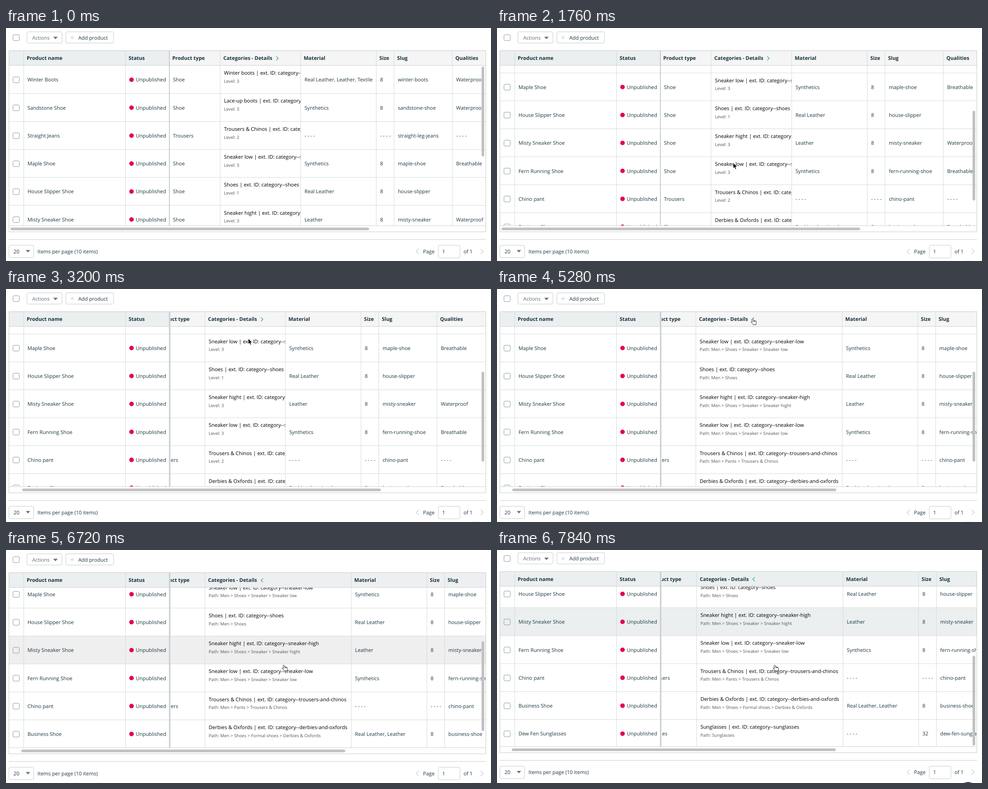
An HTML page for the animation above (8000 ms loop, 1078x519 px).

```html
<!DOCTYPE html>
<html lang="en">
<head>
<meta charset="utf-8">
<title>Product table</title>
<style>
  html, body { margin: 0; width: 100%; height: 100%; overflow: hidden; background: #fff; }
  #stage { display: block; width: 100vw; height: 100vh; }
  svg { overflow: hidden; }
  text { font: 11.33px "Open Sans", sans-serif; fill: #1c3842; text-rendering: geometricPrecision; white-space: pre; }
  .head { font-weight: 700; fill: #16323d; }
  .title { fill: #000; }
  .detail { font-size: 9.71px; fill: #555; }
  .muted { fill: #616d72; }
  .box { fill: none; stroke: #c6caca; }
  .check { fill: none; stroke: #8e979a; }
  .line { fill: none; stroke: #d6d9da; }
  .chevron { fill: none; stroke: #20b08a; stroke-width: 1.3; }
  .pager { fill: none; stroke: #c4c8c9; stroke-width: 1.1; }
  .thumb { fill: #c1c1c1; }
  .caret { fill: #6a7174; }
</style>
</head>
<body>
<svg id="stage" viewBox="0 0 1078 519"></svg>
<script>
const LOOP = 8000, PITCH = 62.27, BODY_TOP = 83.7, EXTRA = 146.4;
const NONE = '- - - -';
const SNEAKER = 'Men > Shoes > Sneaker > ';

// name, type, category, category id, path, material, size, slug, qualities
const PRODUCTS = [
  ['Winter Boots', 'Shoe', 'Winter boots', 'winter-boots', 'Men > Shoes > Boots > Winter boots', 'Real Leather, Leather, Textile', '8', 'winter-boots', 'Waterproof'],
  ['Sandstone Shoe', 'Shoe', 'Lace-up boots', 'lace-up-boots', 'Men > Shoes > Boots > Lace-up boots', 'Synthetics', '8', 'sandstone-shoe', 'Waterproof'],
  ['Straight Jeans', 'Trousers', 'Trousers & Chinos', 'trousers-and-chinos', 'Men > Pants > Trousers & Chinos', NONE, NONE, 'straight-leg-jeans', NONE],
  ['Maple Shoe', 'Shoe', 'Sneaker low', 'sneaker-low', SNEAKER + 'Sneaker low', 'Synthetics', '8', 'maple-shoe', 'Breathable'],
  ['House Slipper Shoe', 'Shoe', 'Shoes', 'shoes', 'Men > Shoes', 'Real Leather', '8', 'house-slipper', ''],
  ['Misty Sneaker Shoe', 'Shoe', 'Sneaker hight', 'sneaker-high', SNEAKER + 'Sneaker hight', 'Leather', '8', 'misty-sneaker', 'Waterproof'],
  ['Fern Running Shoe', 'Shoe', 'Sneaker low', 'sneaker-low', SNEAKER + 'Sneaker low', 'Synthetics', '8', 'fern-running-shoe', 'Breathable'],
  ['Chino pant', 'Trousers', 'Trousers & Chinos', 'trousers-and-chinos', 'Men > Pants > Trousers & Chinos', NONE, NONE, 'chino-pant', NONE],
  ['Business Shoe', 'Shoe', 'Derbies & Oxfords', 'derbies-and-oxfords', 'Men > Shoes > Formal shoes > Derbies & Oxfords', 'Real Leather, Leather', '8', 'business-shoe', 'Breathable'],
  ['Dew Fen Sunglasses', 'Glasses', 'Sunglasses', 'sunglasses', 'Sunglasses', NONE, '32', 'dew-fen-sunglasses', NONE]
];

const LATE_COLUMNS = [['Material', 655], ['Size', 823], ['Slug', 862.5], ['Qualities', 992]];

// Each track holds [start time, value...] steps.
const TRACKS = {
  scrollY: [[0, 0], [960, 12], [1120, 60], [1280, 112.4], [1440, 147], [1600, 164], [1760, 170.5],
    [6720, 203.5], [6880, 240], [7040, 257], [7200, 263], [7520, 264]],
  scrollX: [[0, 0], [2240, 7], [2400, 21], [2560, 31], [2720, 34], [7040, 33], [7200, 32.3]],
  pageY: [[0, 0], [7200, 1], [7520, 1.5], [7840, 2.5]],
  open: [[0, false], [5280, true]],
  hover: [[0, -1], [5920, 3], [6080, 4], [6240, 5]],
  arrow: [[0, -50, -50], [160, 514, 307], [320, 519, 304], [480, 523, 302], [640, 525, 300.5],
    [3200, 538.5, 110.5], [3360, 548, 90], [3520, 557, 77], [3680, 564, 69], [3840, 567, 66.5], [4320, -50, -50]],
  hand: [[0, -50, -50], [4320, 564.3, 65.5], [5920, 585, 120], [6080, 606, 205], [6240, 613.5, 255.5]],
  tint: [[0, '#f5f5f5'], [6720, '#eeeff1'], [6880, '#ebeff0']]
};

const stage = document.getElementById('stage');

function set(node, attrs) {
  for (const key in attrs) node.setAttribute(key, attrs[key]);
  return node;
}
function add(parent, tag, attrs, content) {
  const node = set(document.createElementNS(stage.namespaceURI, tag), attrs || {});
  if (content !== undefined) node.textContent = content;
  return parent.appendChild(node);
}
const group = parent => add(parent, 'g');
const label = (parent, x, y, content, cls = '') => add(parent, 'text', { x, y, class: cls }, content);
const path = (parent, d, cls) => add(parent, 'path', { d, class: cls });
const rect = (parent, x, y, width, height, attrs) => add(parent, 'rect', { x, y, width, height, ...attrs });
const windowBox = (x, y, width, height) => ({ x, y, width, height, viewBox: [x, y, width, height].join(' ') });
const clip = (parent, ...box) => add(parent, 'svg', windowBox(...box));
const move = (node, x, y) => node.setAttribute('transform', `translate(${x} ${y})`);
const checkbox = (parent, y) => rect(parent, 15.5, y - 6.5, 14, 13, { rx: 2.5, class: 'check' });
const button = (parent, x, y, w, h) => rect(parent, x, y, w, h, { rx: 3, class: 'box' });

const page = group(stage);

// Toolbar
checkbox(page, 21.5);
button(page, 46.5, 8.5, 78, 25);
label(page, 58.3, 25.5, 'Actions', 'muted');
path(page, 'M105 19.5h10l-5 5.5z', 'caret');
button(page, 133, 8.5, 106, 25);
path(page, 'M143 21.5h8M147 17.5v8', 'pager');
label(page, 160.7, 25.5, 'Add product');

// Rows behind the text
const rowBack = group(clip(page, 7, 84, 1059.5, 356));
const hoverBar = rect(rowBack, 7, 0, 1060, PITCH);
PRODUCTS.forEach((_, i) => path(rowBack, `M7 ${BODY_TOP + (i + 1) * PITCH}H1067`, 'line'));

// Header
rect(page, 7, 51, 356, 32.5, { fill: '#ebeff0' });
const headBack = rect(page, 363, 51, 703.5, 32.5);
label(page, 46, 71, 'Product name', 'head');
label(page, 272.5, 71, 'Status', 'head');
const headRow = group(clip(page, 364, 51, 702.5, 33));
label(headRow, 369.5, 71, 'Product type', 'head');
label(headRow, 483, 71, 'Categories - Details', 'head');
const chevron = path(headRow, '', 'chevron');
const headLate = group(headRow);

// Column rules
path(page, 'M39.5 51V440M265.5 51V440', 'line');
const rules = group(clip(page, 364, 51, 702.5, 389));
path(rules, 'M476 51V440', 'line');
const rulesLate = group(rules);
for (const [name, x] of LATE_COLUMNS) {
  label(headLate, x + 6.7, 71, name, 'head');
  path(rulesLate, `M${x} 51V440`, 'line');
}

// Cells
const pinned = group(clip(page, 7, 84, 356, 356));
const cells = group(clip(page, 363.5, 84, 703, 356));
const category = clip(cells, 476, 0, 178.5, 800);
const levels = group(category), paths = group(category);
const cellsLate = group(cells);
PRODUCTS.forEach(([name, type, title, id, trail, ...late], i) => {
  const mid = 115.2 + i * PITCH, base = mid + 4.2;
  checkbox(pinned, mid + .3);
  label(pinned, 47.7, base, name);
  add(pinned, 'circle', { cx: 279, cy: mid, r: 5, fill: '#e3004f' });
  label(pinned, 288.5, base, 'Unpublished');
  label(cells, 371, base, type);
  label(category, 484.5, mid - 11, `${title} | ext. ID: category--${id}`, 'title');
  label(levels, 484.5, mid + 6.8, 'Level: ' + (trail.split(' > ').length - 1), 'detail');
  label(paths, 484.5, mid + 6.8, 'Path: ' + trail, 'detail');
  late.forEach((value, k) => label(cellsLate, LATE_COLUMNS[k][1] + 8.4, base, value));
});

// Frame, pinned edge and scrollbars
path(page, 'M7 83.3H1066.5M7 440.3H1066.5', 'line').style.stroke = '#cdd0d1';
const edgeShade = rect(page, 364, 51, 2, 389, { fill: '#dfe3e4' });
rect(page, 362.5, 51, 1.4, 389, { fill: '#b4babc' });
rect(page, 6.5, 50.5, 1060, 403.5, { class: 'box' });
const thumbX = rect(page, 10, 444.5, 797, 6, { rx: 3, class: 'thumb' });
const thumbY = rect(page, 1057, 86, 6, 200, { rx: 3, class: 'thumb' });

// Footer
path(page, 'M6 471H1067', 'box');
button(page, 6.5, 484, 55, 27.5);
label(page, 16.8, 501.8, '20');
path(page, 'M44 494.5h9.5l-4.75 5.5z', 'caret');
label(page, 70, 501.8, 'Items per page (10 items)');
path(page, 'M917.5 492l-6 5.7 6 5.7M1055 492l6 5.7-6 5.7', 'pager');
label(page, 927, 501.8, 'Page');
button(page, 961, 484, 48, 28);
label(page, 969.5, 501.8, '1');
label(page, 1017, 501.8, 'of 1');
add(page, 'circle', { cx: 1047, cy: 540, r: 23, fill: '#f4f4f4' });
add(page, 'circle', { cx: 1047, cy: 540, r: 20.5, fill: '#14333f' });

// Pointers
const arrow = add(stage, 'path', {
  d: 'M0 0V12.2L2.8 9.6 4.7 14 6.9 13 5 8.8H8.9Z',
  fill: '#000', stroke: '#fff', 'stroke-width': .8
});
const hand = add(stage, 'path', {
  d: 'M3.2 1.2c1-.5 1.8 0 2 .9l.6 2.7c.8-.5 1.6-.3 1.9.3.8-.4 1.6-.1 1.9.5.9-.3 1.7.2 1.9 1l.6 2.4c.3 1.4-.3 2.2-.6 3.4l.1 1.3-6 .5c-.3-1.2-1.8-2.2-3-3.3L.7 8.6C0 7.6 1.4 6.9 2.2 7.5l1.1.9L2.2 2.6C2 1.9 2.6 1.4 3.2 1.2zM6 5l.5 2.6M7.9 5.3l.5 2.2M9.7 5.9l.4 1.8',
  fill: '#fff', stroke: '#222', 'stroke-width': 1, 'stroke-linejoin': 'round'
});

function valueAt(name, time) {
  let step;
  for (const entry of TRACKS[name]) if (entry[0] <= time) step = entry;
  return step.length > 2 ? step.slice(1) : step[1];
}

function render(time) {
  const now = name => valueAt(name, time);
  const x = now('scrollX'), y = now('scrollY'), open = now('open'), hover = now('hover');
  const shift = open ? EXTRA : 0;

  move(page, 0, -now('pageY'));
  move(rowBack, 0, -y);
  move(pinned, 0, -y);
  move(cells, -x, -y);
  move(headRow, -x, 0);
  move(rules, -x, 0);
  for (const late of [headLate, rulesLate, cellsLate]) move(late, shift, 0);

  set(category, windowBox(476, 0, 178.5 + shift, 800));
  set(levels, { visibility: open ? 'hidden' : 'visible' });
  set(paths, { visibility: open ? 'visible' : 'hidden' });
  set(chevron, { d: open ? 'M605.3 63.3l-4.5 4.4 4.5 4.4' : 'M600.6 63.3l4.5 4.4-4.5 4.4' });

  const tint = now('tint');
  set(headBack, { fill: tint });
  set(hoverBar, {
    y: BODY_TOP + hover * PITCH,
    fill: time < 6880 ? '#efeff0' : tint,
    visibility: hover < 0 ? 'hidden' : 'visible'
  });
  set(edgeShade, { visibility: x > 0 ? 'visible' : 'hidden' });
  set(thumbX, { x: 10 + x * (open ? .706 : .765), width: open ? 720 : 797 });
  set(thumbY, { y: 86 + y * .576 });
  move(arrow, ...now('arrow'));
  move(hand, ...now('hand'));
}

const start = performance.now();
function tick() {
  render((performance.now() - start) % LOOP);
  requestAnimationFrame(tick);
}
tick();
</script>
</body>
</html>
```
